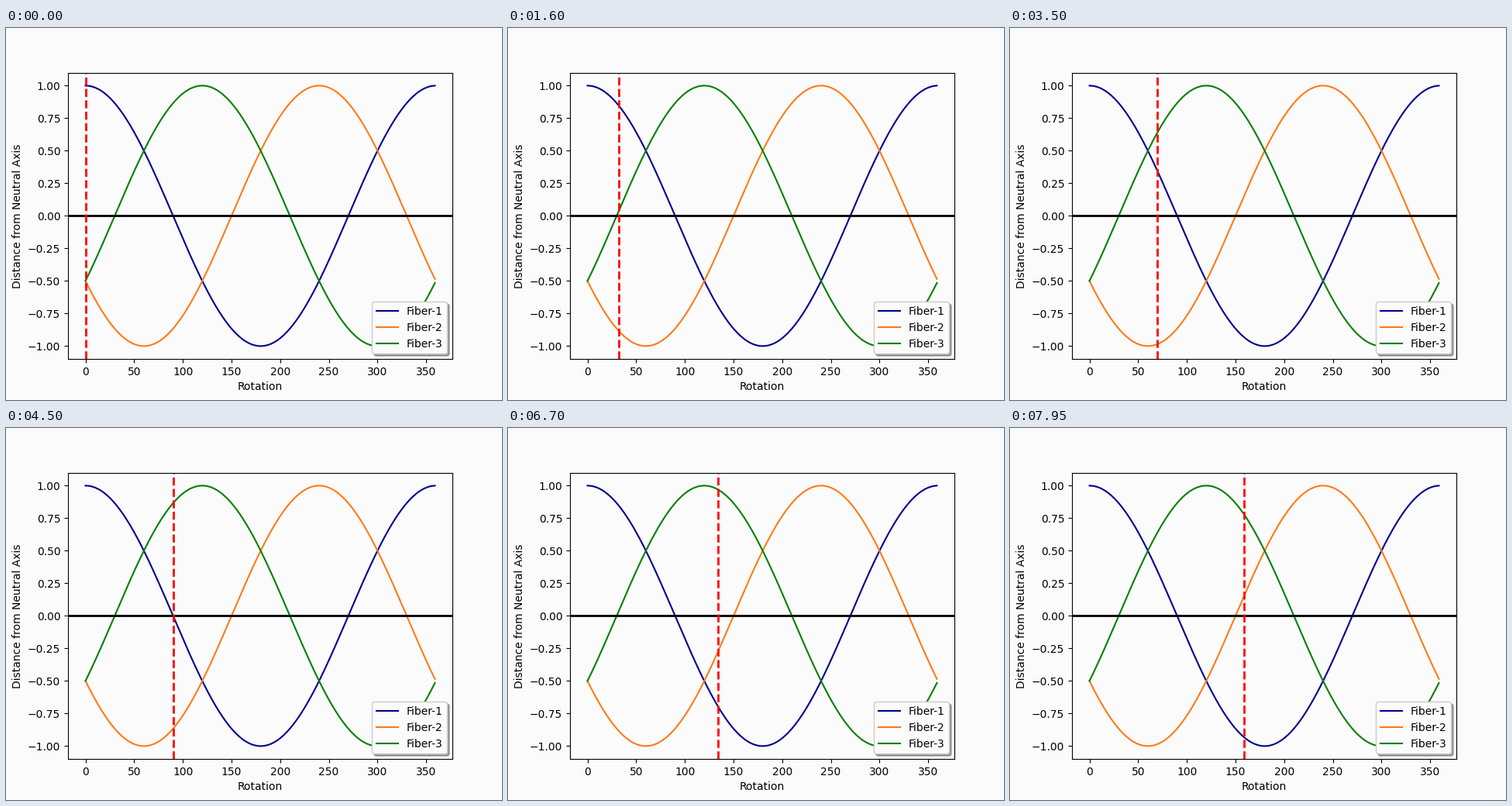
These frames come from a looping animation (640x480 px, 8000 ms). A matplotlib script:

```python
import numpy as np
import matplotlib.pyplot as plt
from matplotlib.animation import FuncAnimation

FRAMES = 160
STEP_MS = 50
PAPER = "#fbfbfb"

plt.rcParams["font.family"] = "DejaVu Sans"

fig, ax = plt.subplots(figsize=(6.4, 4.8), dpi=100, facecolor=PAPER)
ax.set_facecolor(PAPER)

angle = np.arange(360)
fibers = [("Fiber-1", 0, "darkblue"),
          ("Fiber-2", 120, "#ff7a18"),
          ("Fiber-3", 240, "green")]
for name, phase, color in fibers:
    ax.plot(angle, np.cos(np.radians(angle + phase)), color=color, label=name)

ax.axhline(0, color="black", lw=2)
marker = ax.axvline(0, color="red", ls="--", lw=2)

ax.set_xlabel("Rotation")
ax.set_ylabel("Distance from Neutral Axis")
ax.legend(loc="lower right", shadow=True, framealpha=1, facecolor=PAPER)


def update(i):
    marker.set_xdata([i, i])
    return (marker,)


anim = FuncAnimation(fig, update, frames=FRAMES, interval=STEP_MS,
                     repeat=True, repeat_delay=0, blit=False)
plt.show()
```
